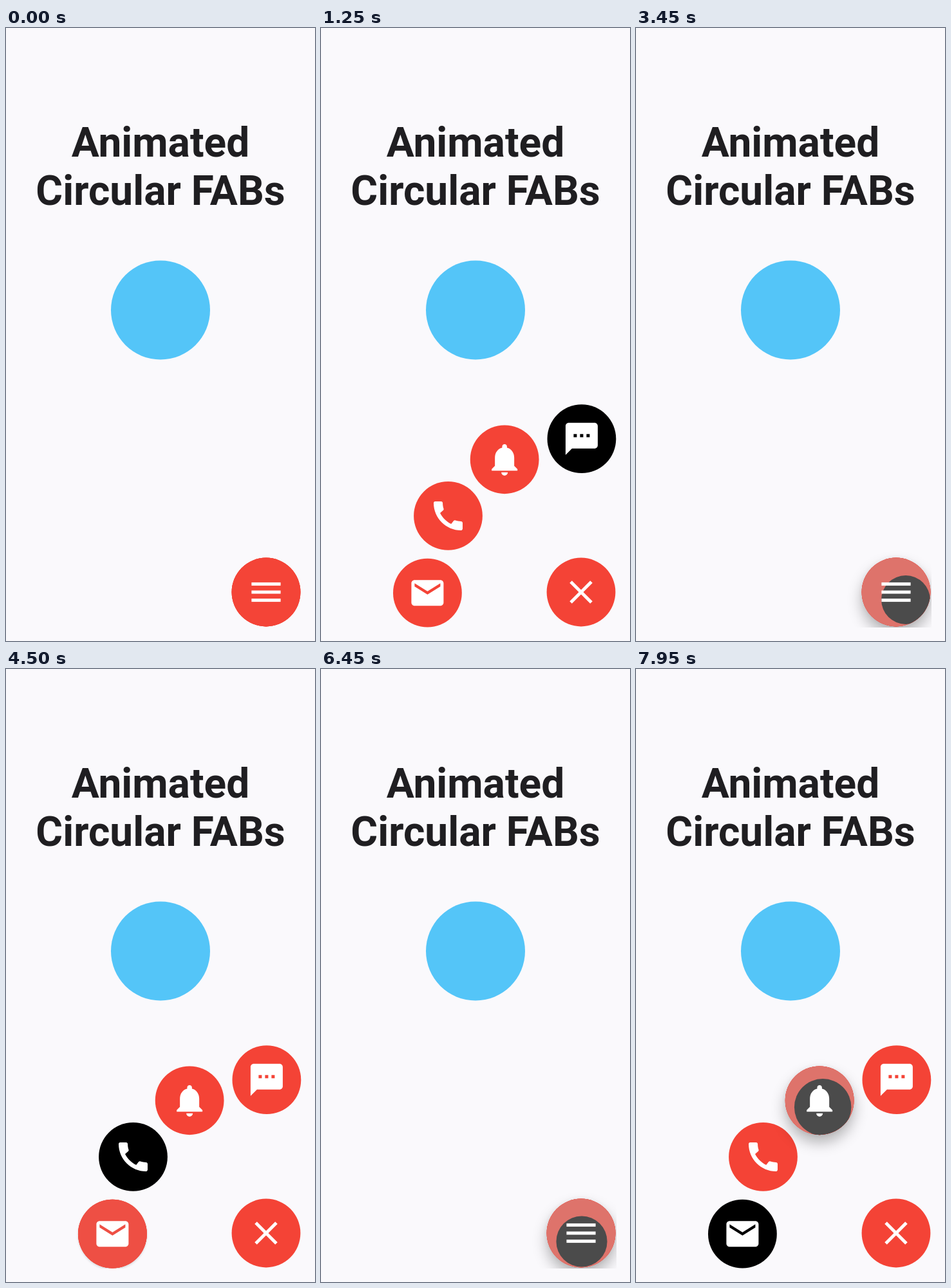
Recreate the animation shown at these times as an HTML page with a canvas. Size 480 px wide and 953 px high, loop 8 s.

```html
<!DOCTYPE html>
<html lang="en">
<head>
<meta charset="utf-8">
<title>Animated Circular FABs</title>
<style>
  html, body { margin: 0; width: 100%; height: 100%; overflow: hidden; background: #faf9fc; }
  canvas { position: absolute; left: 0; top: 0; width: 480px; height: 953px; }
  h1 {
    position: absolute; left: 0; top: 141px; width: 480px; margin: 0;
    font: 700 64px/75px Roboto, sans-serif; color: #1f1e21; text-align: center; white-space: nowrap;
  }
</style>
</head>
<body>
<canvas id="stage" width="480" height="953"></canvas>
<h1>Animated<br>Circular FABs</h1>
<script>
const LOOP = 8000;
const RED = '#f44336';
const DP = 4 / 3;            // pixels per layout unit
const BUTTON_R = 53.4;
const MENU_R = 239.5;
const OPEN_MS = 280;
const FADE_MS = 200;
const HOME = { x: 404.9, y: 878.2 };
const MAIN = { x: 404, y: 877 };

const canvas = document.getElementById('stage');
const ctx = canvas.getContext('2d');
const ratio = window.devicePixelRatio || 1;
canvas.width = 480 * ratio;
canvas.height = 953 * ratio;

const icons = {
  mail: 'M20 4H4c-1.1 0-1.99.9-1.99 2L2 18c0 1.1.9 2 2 2h16c1.1 0 2-.9 2-2V6c0-1.1-.9-2-2-2zm0 4l-8 5-8-5V6l8 5 8-5v2z',
  call: 'M20.01 15.38c-1.23 0-2.42-.2-3.53-.56-.35-.12-.74-.03-1.01.24l-1.57 1.97c-2.83-1.35-5.48-3.9-6.89-6.83l1.95-1.66c.27-.28.35-.67.24-1.02-.37-1.11-.56-2.3-.56-3.53 0-.54-.45-.99-.99-.99H4.19C3.65 3 3 3.24 3 3.99 3 13.28 10.73 21 20.01 21c.71 0 .99-.63.99-1.18v-3.45c0-.54-.45-.99-.99-.99z',
  bell: 'M12 22c1.1 0 2-.9 2-2h-4c0 1.1.89 2 2 2zm6-6v-5c0-3.07-1.64-5.64-4.5-6.32V4c0-.83-.67-1.5-1.5-1.5s-1.5.67-1.5 1.5v.68C7.63 5.36 6 7.92 6 11v5l-2 2v1h16v-1l-2-2z',
  chat: 'M20 2H4c-1.1 0-1.99.9-1.99 2L2 22l4-4h14c1.1 0 2-.9 2-2V4c0-1.1-.9-2-2-2zM9 11H7V9h2v2zm4 0h-2V9h2v2zm4 0h-2V9h2v2z'
};
const items = Object.keys(icons);
const paths = items.map(name => new Path2D(icons[name]));

// Touches: position is relative to the button centre.
const presses = [
  { on: 'main', x: 8, y: 12, down: 0, up: 629 },
  { on: 'call', x: 14.5, y: 21.5, down: 1695, up: 2457 },
  { on: 'main', x: 15, y: 12, down: 3050, up: 3950 },
  { on: 'mail', x: 10, y: 14, down: 4450, up: 5189 },
  { on: 'main', x: 1, y: 13, down: 5990, up: 6774 },
  { on: 'bell', x: 5, y: 10.5, down: 7440, up: 8200 }
];

const clamp = x => Math.max(0, Math.min(1, x));
const smooth = x => x * x * (3 - 2 * x);

function openness(t) {
  let value = 0;
  for (const p of presses) {
    if (t < p.up) break;
    const k = clamp((t - p.up) / OPEN_MS);
    value = p.on === 'main' ? k : 1 - k;
  }
  return value;
}

function selected(t) {
  let name = 'chat';
  for (const p of presses) if (p.on !== 'main' && t >= p.up) name = p.on;
  return name;
}

function pressOn(name, t) {
  return presses.find(p => p.on === name && t >= p.down && t < p.up + FADE_MS);
}

function disc(x, y, r, color) {
  ctx.fillStyle = color;
  ctx.beginPath();
  ctx.arc(x, y, r, 0, Math.PI * 2);
  ctx.fill();
}

function castShadow(level, scale) {
  const z = 12 * DP * level * scale * ratio;
  for (const [alpha, blur, drop] of [[0.29, 1.4, 0.75], [0.06, 0.6, 0]]) {
    ctx.shadowColor = `rgba(0,0,0,${alpha * Math.min(1, level * 3)})`;
    ctx.shadowBlur = z * blur;
    ctx.shadowOffsetY = z * drop;
    disc(0, 0, BUTTON_R, RED);
  }
  ctx.shadowColor = 'transparent';
}

function button(name, color, t, scale) {
  const p = pressOn(name, t);
  if (!p) return disc(0, 0, BUTTON_R, color);

  const released = Math.max(0, t - p.up);
  const held = Math.min(t, p.up) - p.down;
  const fade = 1 - clamp(released / FADE_MS);
  const glow = clamp(held / FADE_MS) * fade;
  const reach = Math.hypot(Math.abs(p.x) + BUTTON_R, Math.abs(p.y) + BUTTON_R);
  const grown = clamp(held / 1000 + released / (reach / DP));

  if (glow > 0) castShadow(smooth(glow), scale);
  disc(0, 0, BUTTON_R, color);
  ctx.save();
  ctx.beginPath();
  ctx.arc(0, 0, BUTTON_R, 0, Math.PI * 2);
  ctx.clip();
  disc(p.x, p.y, reach * grown, `rgba(0,0,0,${fade})`);
  ctx.restore();
  disc(0, 0, BUTTON_R, `rgba(188,188,188,${0.4 * glow})`);
}

function item(i, t, open) {
  const angle = i * Math.PI / 6;
  const scale = Math.max(open, 0.5);
  ctx.save();
  ctx.translate(HOME.x - MENU_R * open * Math.cos(angle), HOME.y - MENU_R * open * Math.sin(angle));
  ctx.rotate(Math.PI * (1 - open));
  ctx.scale(scale, scale);
  button(items[i], selected(t) === items[i] ? '#000' : RED, t, scale);
  ctx.scale(2.5, 2.5);
  ctx.translate(-12, -12);
  ctx.fillStyle = '#fff';
  ctx.fill(paths[i]);
  ctx.restore();
}

function bar(y, angle, alpha) {
  ctx.save();
  ctx.translate(0, y);
  ctx.rotate(angle);
  ctx.fillStyle = `rgba(255,255,255,${alpha})`;
  ctx.fillRect(-22.6, -2.5, 45.2, 5);
  ctx.restore();
}

function mainButton(t, open) {
  ctx.save();
  ctx.translate(MAIN.x, MAIN.y);
  button('main', RED, t, 1);
  const gap = 12.6 * (1 - open);
  const turn = Math.PI / 4 * open;
  bar(-gap, turn, 1);
  bar(0, 0, 1 - open);
  bar(gap, -turn, 1);
  ctx.restore();
}

function draw(t) {
  const open = openness(t);
  ctx.setTransform(ratio, 0, 0, ratio, 0, 0);
  ctx.clearRect(0, 0, 480, 953);
  disc(240, 438.5, 77, '#54c5f8');
  ctx.save();
  ctx.beginPath();
  ctx.rect(0, 0, 459, 932);
  ctx.clip();
  items.forEach((_, i) => item(i, t, open));
  mainButton(t, open);
  ctx.restore();
}

const start = performance.now();
function tick() {
  draw((performance.now() - start) % LOOP);
  requestAnimationFrame(tick);
}
tick();
</script>
</body>
</html>
```
